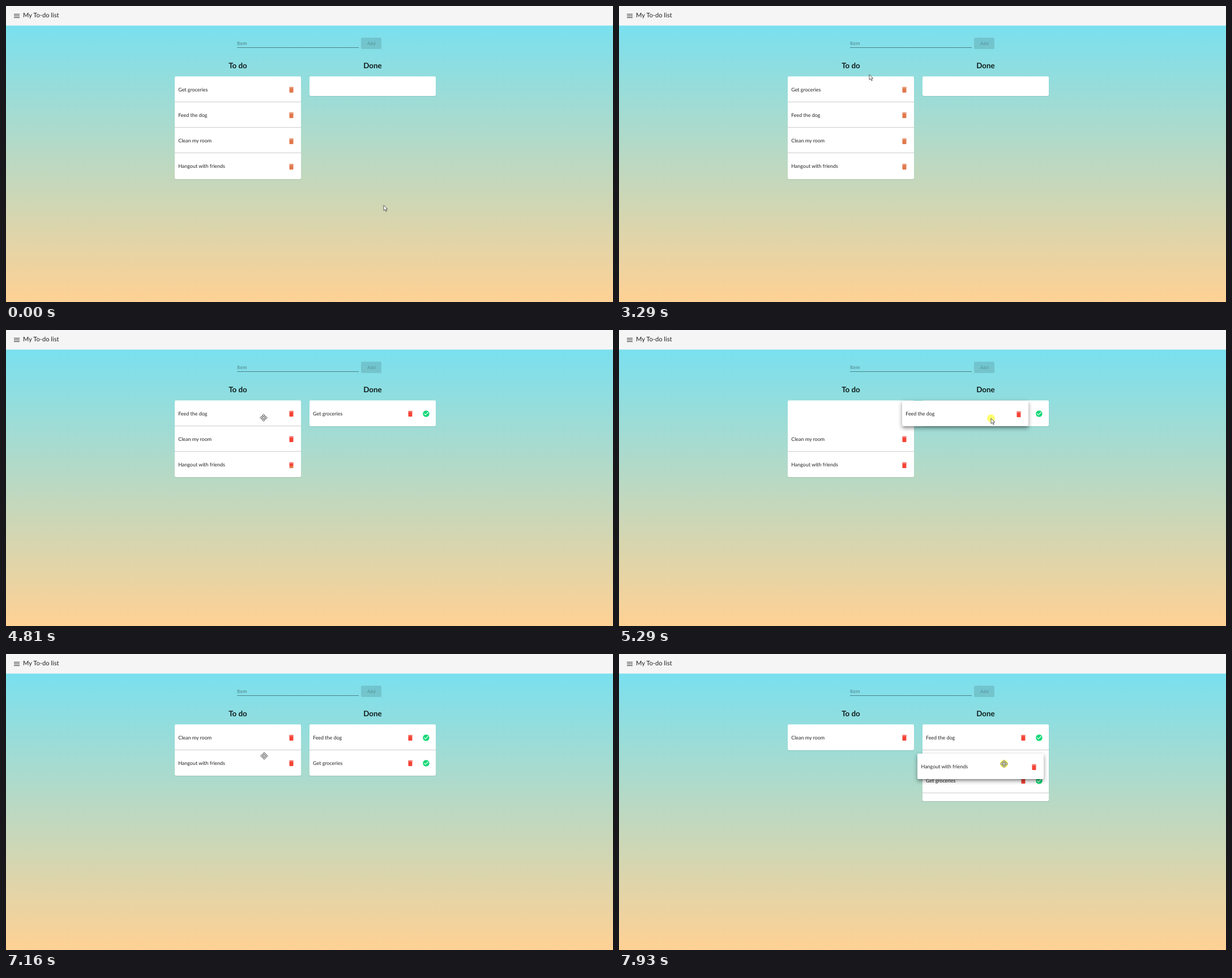
Animation of 1072x523 px, one loop 8000 ms. Source, as an HTML page:

```html
<!DOCTYPE html>
<html lang="en">
<head>
<meta charset="utf-8">
<title>My To-do list</title>
<style>
  html, body { margin: 0; width: 100%; height: 100%; overflow: hidden; }
  body {
    position: relative;
    background: linear-gradient(#70e1f5, #ffd194);
    font: 8.93px/20px Lato, sans-serif;
    text-rendering: geometricPrecision;
    color: rgba(0, 0, 0, .87);
  }
  body div, body svg { position: absolute; white-space: nowrap; }
  .bar {
    left: 0; top: 0; width: 100%; height: 34px; background: #f5f5f5 padding-box;
    border-bottom: 1px solid rgba(245, 245, 245, .6);
  }
  .bar i { position: absolute; left: 14px; width: 10px; height: 1.1px; background: #222; }
  .title { left: 30px; top: 7px; font-size: 11.17px; }
  .field {
    left: 408px; top: 56px; width: 214.5px; height: 17px;
    border-bottom: 1px solid rgba(0, 0, 0, .42); color: rgba(0, 0, 0, .42);
  }
  .add {
    left: 627.3px; top: 56.3px; width: 35.8px; height: 20.2px; border-radius: 2px;
    background: rgba(0, 0, 0, .12); color: rgba(0, 0, 0, .26);
    font-size: 7.8px; letter-spacing: .02857em; text-align: center;
  }
  .head { top: 95px; width: 223px; font-size: 13.4px; font-weight: 700; text-align: center; }
  .panel {
    top: 124px; width: 223px; box-sizing: border-box; border-radius: 2px;
    background: #fff padding-box; border-top: 1px solid rgba(255, 255, 255, .6);
    box-shadow: 0 1px 1px rgba(0, 0, 0, .1);
  }
  .row { width: 223px; height: 45.3px; box-sizing: border-box; border-bottom: 1px solid transparent; }
  .row.line { border-color: #ccc; }
  .row.drag {
    z-index: 2; height: 44.8px; background: #fff; border-radius: 2px;
    box-shadow: 0 3px 3px -2px rgba(0, 0, 0, .25), 0 4px 6px rgba(0, 0, 0, .25), 0 2px 8px 1px rgba(0, 0, 0, .14);
  }
  .label { left: 6px; top: 13px; }
  .icon { top: 16.5px; width: 24px; height: 24px; transform: scale(.58); transform-origin: 0 0; }
  .trash { clip-path: path("M6 19c0 1.1.9 2 2 2h8c1.1 0 2-.9 2-2V7H6v12zM19 4h-3.5l-1-1h-5l-1 1H5v2h14V4z"); }
  .check {
    left: 199px; background: #16d877;
    clip-path: path(evenodd, "M12 2C6.48 2 2 6.48 2 12s4.48 10 10 10 10-4.48 10-10S17.52 2 12 2zm-2 15-5-5 1.41-1.41L10 14.17l7.59-7.59L19 8l-9 9z");
  }
  #pointer { z-index: 3; width: 1px; height: 1px; overflow: visible; }
  #pointer path { fill: #fff; stroke: #333; stroke-width: .8; stroke-linejoin: round; }
  #pointer circle { fill: #ff3; fill-opacity: .7; }
</style>
</head>
<body>
<div class="bar">
  <i style="top:13.6px"></i><i style="top:16.8px"></i><i style="top:19.8px"></i>
  <div class="title">My To-do list</div>
</div>
<div class="field">Item</div>
<div class="add">Add</div>
<div class="head" style="left:298px">To do</div>
<div class="head" style="left:536px">Done</div>
<div class="panel" id="todo" style="left:298px"></div>
<div class="panel" id="done" style="left:536px"></div>
<svg id="pointer">
  <circle id="press" r="7"/>
  <path id="arrow" d="M0 0V9.5L2.3 7.4 3.9 11 5.4 10.3 3.9 6.9H6.8Z"/>
  <path id="move" d="M0-6.5 2.5-3.6H.9V-.9H3.6V-2.5L6.5 0 3.6 2.5V.9H.9V3.6H2.5L0 6.5-2.5 3.6H-.9V.9H-3.6V2.5L-6.5 0-3.6-2.5V-.9H-.9V-3.6H-2.5Z"/>
</svg>
<script>
const LOOP = 8000, LEFT = 298.2, RIGHT = 536, WIDTH = 223, TOP = 124.5, PITCH = 45.3;
const SHIFT = 200, LAG = 170, SETTLE = 240;
const $ = id => document.getElementById(id);
const row = n => TOP + n * PITCH;
const mix = (a, b, k) => a + (b - a) * k;
const ease = k => (k = Math.min(1, Math.max(0, k)), k * k * (3 - 2 * k));

// Pointer stops: time, x, y.
const stops = [
  [1350, 667, 352], [1770, 424, 77], [3220, 424, 77], [3290, 442.5, 121],
  [3500, 372, 151], [3950, 358, 220], [4060, 388, 215], [4190, 613, 168],
  [4400, 640, 142], [4810, 455, 155], [4950, 455, 155], [5400, 692, 156],
  [5560, 690, 152], [5830, 450, 174], [7090, 450, 174], [7300, 471, 195],
  [7580, 615, 273], [7860, 698, 203], [7930, 680, 194]
];

// "over": when the other rows make way; "slot": rank in the Done list.
const drags = [
  { item: 0, grab: 3500, over: 4020, drop: 4400, slot: 0 },
  { item: 1, grab: 4950, over: 5400, drop: 5450, slot: 0 },
  { item: 3, grab: 7300, over: 7806, drop: 7860, slot: 1 }
];

function pointerAt(t) {
  const i = stops.findIndex(s => s[0] > t);
  if (i === 0) return stops[0].slice(1);
  if (i < 0) return stops[stops.length - 1].slice(1);
  const [t0, x0, y0] = stops[i - 1], [t1, x1, y1] = stops[i];
  const k = ease((t - t0) / (t1 - t0));
  return [mix(x0, x1, k), mix(y0, y1, k)];
}

// Rows below a lifted one close up in turn.
function todoY(i, t) {
  const gone = drags.filter(d => d.item < i)
    .reduce((sum, d) => sum + ease((t - d.over - (i - d.item - 1) * LAG) / SHIFT), 0);
  return row(i - gone);
}

function doneY(drag, t) {
  let rank = drag.slot;
  for (const d of drags.slice(drags.indexOf(drag) + 1)) {
    if (d.slot <= Math.round(rank)) rank += ease((t - d.over) / SHIFT);
  }
  return row(rank);
}

function cardAt(i, drag, t) {
  if (!drag || t < drag.grab) return [LEFT, todoY(i, t)];
  const from = pointerAt(drag.grab), now = pointerAt(Math.min(t, drag.drop));
  const x = LEFT + now[0] - from[0];
  const y = todoY(i, drag.grab) + now[1] - from[1];
  const k = ease((t - drag.drop) / SETTLE);
  return [mix(x, RIGHT, k), mix(y, doneY(drag, t), k)];
}

function make(cls, parent, text = "") {
  const el = document.createElement("div");
  el.className = cls;
  el.textContent = text;
  return parent.appendChild(el);
}

const items = ["Get groceries", "Feed the dog", "Clean my room", "Hangout with friends"].map((text, i) => {
  const el = make("row", document.body);
  make("label", el, text);
  return {
    el, trash: make("icon trash", el), check: make("icon check", el),
    drag: drags.find(d => d.item === i)
  };
});

function place(el, x, y) {
  el.style.left = x + "px";
  el.style.top = y + "px";
}

function show(el, on) {
  el.style.display = on ? "" : "none";
}

function render(t) {
  const moved = drags.filter(d => t >= d.drop).length;
  const todoH = (items.length - moved) * PITCH, doneH = moved ? moved * PITCH : 34;
  $("todo").style.height = todoH + .5 + "px";
  $("done").style.height = doneH + .5 + "px";

  // Bins below this height still have the duller colour.
  const edge = t < drags[0].grab ? 0 : t < drags[1].grab ? 240 : 999;
  items.forEach(({ el, trash, check, drag }, i) => {
    const [x, y] = cardAt(i, drag, t);
    const finished = !!drag && t >= drag.drop + SETTLE;
    const held = !!drag && t >= drag.grab && !finished;
    const bottom = TOP + (x < RIGHT ? todoH : doneH);
    place(el, x, y);
    el.classList.toggle("drag", held);
    el.classList.toggle("line", !held && y + PITCH < bottom - 2);
    show(check, finished);
    trash.style.left = (finished ? 171 : 198.8) + "px";
    const cut = (edge - y - 16.5) / .58;
    trash.style.background = `linear-gradient(#f44336 ${cut}px, #e0784c ${cut}px)`;
  });

  const [px, py] = pointerAt(t);
  const inside = (left, height) => px > left && px < left + WIDTH && py > TOP && py < TOP + height;
  const dragging = drags.some(d => t >= d.grab && t < d.drop);
  const hover = !dragging && (inside(LEFT, todoH) || inside(RIGHT, doneH));
  place($("pointer"), px, py);
  show($("press"), drags.some(d => t >= d.grab && t < d.drop + 100));
  show($("move"), hover);
  show($("arrow"), !hover);
}

function tick() {
  render(performance.now() % LOOP);
  requestAnimationFrame(tick);
}
tick();
</script>
</body>
</html>
```
